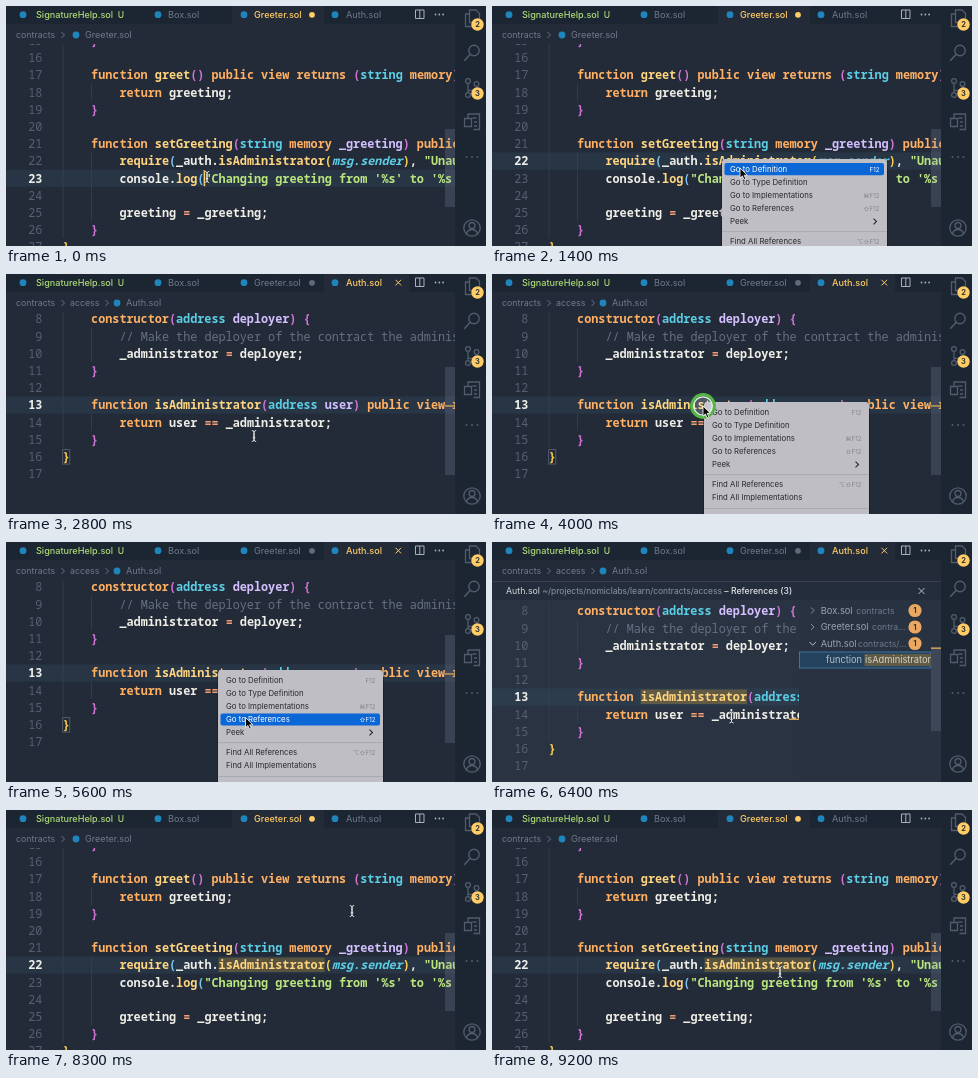
Write an HTML page that moves like this. It is 480 by 240 pixels and loops after 9.3 s.

```html
<!DOCTYPE html>
<html lang="en">
<head>
<meta charset="utf-8">
<title>Code navigation</title>
<style>
  html, body { margin: 0; width: 100%; height: 100%; overflow: hidden; background: #232b39; }
  svg { display: block; width: 480px; height: 240px; }
  text { white-space: pre; font-family: Inter, "Liberation Sans", "DejaVu Sans", sans-serif; }
  .code { font: 700 11.8px "Noto Sans Mono", "DejaVu Sans Mono", monospace; }
  .row rect { fill: none; }
  .row text { fill: #29292d; }
  .row .key { fill: #85848b; }
  .row path { stroke: #29292d; }
  .row.on rect { fill: #0b66d6; }
  .row.on text { fill: #fff; }
  .row.on path { stroke: #fff; }
</style>
</head>
<body>
<svg id="stage" viewBox="0 0 480 240"></svg>
<script>
const NS = 'http://www.w3.org/2000/svg';
const stage = document.getElementById('stage');
const LOOP = 9300, CH = 7.08, LINE = 17.2, LEFT = 56.7;
const BG = '#232b39', BAR = '#1c2532', DIM = '#707a8c', FG = '#eeede6', GOLD = '#ffcc66';
const BRACKETS = ['#ffd24d', '#d474d8', '#7cc4f5'];

function el(parent, tag, attrs = {}, text) {
  const node = document.createElementNS(NS, tag);
  for (const k in attrs) node.setAttribute(k, attrs[k]);
  if (text !== undefined) node.textContent = text;
  return parent.appendChild(node);
}
const group = (parent, attrs) => el(parent, 'g', attrs);
const rect = (parent, x, y, width, height, fill, more) =>
  el(parent, 'rect', { x, y, width, height, fill, ...more });
const line = (parent, d, stroke, width = 1, more) =>
  el(parent, 'path', { d, stroke, fill: 'none', 'stroke-width': width, ...more });
const dot = (parent, cx, cy, r, fill) => el(parent, 'circle', { cx, cy, r, fill });
// y is the middle of the text
const label = (parent, x, y, text, size, fill, more) =>
  el(parent, 'text', { x, y: y + size * 0.36, 'font-size': size, fill, ...more }, text);
const show = (node, on) => { node.style.display = on ? '' : 'none'; };

function clip(id, x, y, width, height) {
  rect(el(stage, 'clipPath', { id }), x, y, width, height);
  return `url(#${id})`;
}

// Syntax colouring
const TOKEN = /\/\/.*|"[^"]*"?|msg\.sender|(?<=(?:memory|address) )\w+|\w+(?=\()|\w+|[(){}]|=+|[^\w(){}="]/g;
const KEYWORDS = /^(function|constructor|public|view|returns|return|memory)$/;
const TYPES = /^(string|address|bool)$/;

function paint(parent, x, y, source, depth) {
  const text = el(parent, 'text', { x, y: y + 4.4, class: 'code', fill: FG });
  for (const m of source.matchAll(TOKEN)) {
    const s = m[0], before = source.slice(0, m.index), after = source[m.index + s.length];
    const attrs = {};
    if (s.startsWith('//')) { attrs.fill = '#657080'; attrs['font-weight'] = 500; }
    else if (s[0] === '"') attrs.fill = '#bae67e';
    else if (s === 'msg.sender') { attrs.fill = '#5ccfe6'; attrs['font-style'] = 'italic'; }
    else if (/[({]/.test(s)) attrs.fill = BRACKETS[depth++ % 3];
    else if (/[)}]/.test(s)) attrs.fill = BRACKETS[--depth % 3];
    else if (KEYWORDS.test(s)) attrs.fill = '#ffb062';
    else if (TYPES.test(s)) attrs.fill = '#5ccfe6';
    else if (/^=/.test(s)) attrs.fill = '#f29e74';
    else if (/\w/.test(s) && after === '(') attrs.fill = '#ffd580';
    else if (/(memory|address) $/.test(before)) attrs.fill = '#d4bfff';
    el(text, 'tspan', attrs, s);
  }
  return depth;
}

const GREETER = {
  first: 15, top: 34.6, depth: 2, guides: [[15, 26, 0], [18, 18, 4], [22, 25, 4]],
  lines: [
    '    }', '',
    '    function greet() public view returns (string memory) {',
    '        return greeting;',
    '    }', '',
    '    function setGreeting(string memory _greeting) public {',
    '        require(_auth.isAdministrator(msg.sender), "Unauthorized");',
    '        console.log("Changing greeting from \'%s\' to \'%s\'", greeting, _greeting);', '',
    '        greeting = _greeting;',
    '    }',
    '}'
  ]
};
const AUTH = {
  first: 8, top: 45, depth: 1, guides: [[8, 15, 0], [9, 10, 4], [14, 14, 4]],
  lines: [
    '    constructor(address deployer) {',
    '        // Make the deployer of the contract the administrator',
    '        _administrator = deployer;',
    '    }', '',
    '    function isAdministrator(address user) public view returns (bool) {',
    '        return user == _administrator;',
    '    }',
    '}', ''
  ]
};

// Draws a file; returns a function that moves the current line
function editor(parent, file, shift = 0) {
  const yOf = n => file.top + shift + (n - file.first) * LINE;
  const band = rect(parent, 0, 0, 449, LINE, '#5a9cb8', { opacity: 0.09 });
  const marks = group(parent);
  for (const [a, b, col] of file.guides)
    rect(parent, LEFT + col * CH, yOf(a) - 8.6, 0.7, (b - a + 1) * LINE, '#3a4252');
  let depth = file.depth;
  const numbers = file.lines.map((source, i) => {
    const n = file.first + i;
    depth = paint(parent, LEFT, yOf(n), source, depth);
    return el(parent, 'text', { x: 36.3, y: yOf(n) + 4.4, class: 'code', 'text-anchor': 'end' }, n);
  });
  const setLine = current => {
    band.setAttribute('y', yOf(current) - 8.6);
    numbers.forEach((node, i) => {
      const on = file.first + i === current;
      node.setAttribute('fill', on ? '#f0f0ea' : '#566070');
      node.style.fontWeight = on ? 700 : 500;
    });
  };
  return { setLine, marks, yOf };
}

const TABS = [
  ['SignatureHelp.sol', 17, 30], ['Box.sol', 152, 162],
  ['Greeter.sol', 238, 248], ['Auth.sol', 329, 340]
];
const chevron = (parent, x, y, color = DIM) =>
  line(parent, `M${x - 1.5} ${y - 3}l3 3l-3 3`, color, 0.9);
const fileIcon = (parent, x, y) => dot(parent, x, y, 3.4, '#1f86bd');

function header(parent, active, crumbs) {
  rect(parent, 0, 0, 449, 38, BG);
  rect(parent, 0, 0, 449, 18, BAR);
  const [x, w] = active === 2 ? [226, 92] : [318, 85];
  rect(parent, x, 0, w, 18, BG);
  TABS.forEach(([name, ix, tx], i) => {
    const on = i === active;
    fileIcon(parent, ix, 8.7);
    label(parent, tx, 8.8, name, 9.1, on ? GOLD : i ? DIM : '#aedb76',
      { 'font-weight': on || !i ? 500 : 400 });
  });
  label(parent, 111.7, 8.8, 'U', 8.6, '#aedb76', { 'font-weight': 500 });
  dot(parent, 306, 8.8, 2.9, active === 2 ? GOLD : '#606a7b');
  if (active === 3) line(parent, 'M389.5 5.8l5.6 5.6m0-5.6l-5.6 5.6', GOLD, 1);
  line(parent, 'M409.5 4h8.5v8.5h-8.5zM413.8 4v8.5', '#a9b0ba', 1);
  for (const cx of [429.5, 433.3, 437.1]) dot(parent, cx, 8.5, 0.9, '#a9b0ba');

  label(parent, 10, 29, 'contracts', 8.8, DIM);
  chevron(parent, 57, 29);
  if (crumbs) {
    label(parent, 64, 29, 'access', 8.8, DIM);
    chevron(parent, 101, 29);
  }
  fileIcon(parent, crumbs ? 111 : 70, 29);
  label(parent, crumbs ? 120 : 79, 29, TABS[active][0], 9.1, DIM);
}

const slider = (parent, y, height) =>
  rect(parent, 439, y, 10, height, '#8794a8', { opacity: 0.22 });

const editorClip = clip('editor', 0, 0, 449, 240);
const previewClip = clip('preview', 0, 58, 307, 182);
const treeClip = clip('tree', 307, 58, 132, 182);

// Greeter.sol
const greeterView = group(stage, { 'clip-path': editorClip });
const greeter = editor(greeterView, GREETER);
const word = rect(greeter.marks, LEFT + 22 * CH, greeter.yOf(22) - 7.5, 15 * CH, 14.5, '#57533f');
const caret = rect(greeterView, 197.6, greeter.yOf(23) - 8, 1.6, 16, GOLD);
slider(greeterView, 123, 78);
header(greeterView, 2, false);

// Auth.sol
const authView = group(stage, { 'clip-path': editorClip });
const auth = editor(authView, AUTH);
auth.setLine(13);
rect(auth.marks, LEFT, auth.yOf(16) - 7, CH, 14.5, 'none', { stroke: '#5b6573', 'stroke-width': 0.8 });
slider(authView, 93, 108);
rect(authView, 439, 131.3, 10, 1.3, '#d8a657');
header(authView, 3, true);

// References panel
const peek = group(stage, { 'clip-path': editorClip });
rect(peek, 0, 39, 449, 201, '#293342');
rect(peek, 0, 39, 449, 19, '#242d3b');
rect(peek, 0, 39, 449, 0.8, '#3b4658');
label(peek, 14, 49, 'Auth.sol', 8.8, '#d5d8dc');
const path = label(peek, 50.5, 49, '~/projects/nomiclabs/learn/contracts/access', 8.45, '#8d96a5');
el(path, 'tspan', { fill: '#e2e4e7', 'font-size': 8.7, 'font-weight': 500 }, ' – References (3)');
line(peek, 'M426.5 46l6 6m0-6l-6 6', '#b8bec8', 1);
const preview = group(peek, { 'clip-path': previewClip });
const previewCode = editor(preview, AUTH, 24);
previewCode.setLine(13);
rect(previewCode.marks, LEFT + 13 * CH, previewCode.yOf(13) - 7.5, 15 * CH, 14.5, '#615b45');
rect(preview, 297, 176.5, 10, 1.5, '#d8a657');
rect(peek, 307, 58, 142, 182, '#283241');
slider(peek, 105, 84);
rect(peek, 439, 105.5, 10, 1.4, '#d8a657');

function tree(rows, selected) {
  const g = group(peek, { 'clip-path': treeClip });
  rows.forEach(([name, rest, restX, open], i) => {
    const y = 68.5 + i * 16.5, on = i === selected;
    if (on) rect(g, 307.5, y - 8, 131, 16, '#23425e', { stroke: '#4480b0', 'stroke-width': 0.8 });
    if (open === undefined) {
      rect(g, restX - 0.5, y - 6, 80, 12, '#615b45');
      label(g, 334, y, name, 9.3, '#b9bec6');
      label(g, restX, y, rest, 9.3, '#d3d3cb');
      return;
    }
    if (open) line(g, `M317.5 ${y - 1.5}l3.2 3.2l3.2-3.2`, '#b8bec8', 1);
    else chevron(g, 320.5, y, '#8d96a5');
    label(g, 328.7, y, name, on ? 8.9 : 9.3, on ? '#fff' : '#9aa2ae', on ? { 'font-weight': 600 } : {});
    label(g, restX, y, rest, 8.6, on ? '#c3cad3' : '#707a8c');
    dot(g, 423, y, 6.6, '#e8a862');
    label(g, 423, y, '1', 8, '#242936', { 'text-anchor': 'middle', 'font-weight': 600 });
  });
  return g;
}
const BOX_ROW = ['Box.sol', 'contracts', 364.3, false];
const AUTH_ROWS = [['Auth.sol', 'contracts/...', 366, true], ['function', 'isAdministrator', 373]];
const treeBefore = tree([BOX_ROW, ['Greeter.sol', 'contra...', 380, false], ...AUTH_ROWS], 3);
const treeAfter = tree([BOX_ROW, ['Greeter.sol', 'contra...', 380, true],
  ['require(_auth.', 'isAdministrator', 396], ...AUTH_ROWS], 1);

// Activity bar
const side = group(stage);
const ICON = '#525c6a';
rect(side, 449, 0, 31, 240, BAR);
function badge(y, n) {
  dot(side, 471.5, y, 6.2, GOLD);
  label(side, 471.5, y, n, 7.6, BAR, { 'text-anchor': 'middle', 'font-weight': 600 });
}
line(side, 'M463.5 4h6.5l3.5 3.5v9h-10zM463.5 8h-4v12.5h10v-4', ICON, 1.3);
badge(18.5, 2);
el(side, 'circle', { cx: 468, cy: 44.5, r: 5.2, fill: 'none', stroke: ICON, 'stroke-width': 1.4 });
line(side, 'M464.3 48.3l-6 6.5', ICON, 1.5);
for (const [cx, cy] of [[462, 75], [462, 89], [470.5, 78]])
  el(side, 'circle', { cx, cy, r: 2.4, fill: 'none', stroke: ICON, 'stroke-width': 1.3 });
line(side, 'M462 77.5v9M470.5 80.5q0 4-8.5 4', ICON, 1.3);
badge(87.5, 3);
line(side, 'M462 112v-4h11.5v15.5h-6M458.5 112.5h7v8h-7zM466.5 112h4M468 116h3M468 120h3', ICON, 1.3);
for (const cx of [460.5, 466, 471.5]) dot(side, cx, 151, 1, ICON);
for (const [cy, r] of [[222, 8.2], [219.5, 3]])
  el(side, 'circle', { cx: 466, cy, r, fill: 'none', stroke: ICON, 'stroke-width': 1.3 });
line(side, 'M460.5 228q1-4.5 5.5-4.5t5.5 4.5', ICON, 1.3);

// Context menu
const menu = group(stage);
rect(menu, -1, 0, 167, 160, '#000', { rx: 4, opacity: 0.25 });
rect(menu, 0, 0, 165, 160, '#bfbec5', { rx: 3.5 });
for (const y of [72.3, 106]) rect(menu, 0, y, 165, 0.8, '#a5a4ab');
const rows = [
  [10, 'Go to Definition', 'F12'], [23, 'Go to Type Definition', ''],
  [36.2, 'Go to Implementations', '⌘F12'], [49.4, 'Go to References', '⇧F12'],
  [62.5, 'Peek', null], [82.5, 'Find All References', '⌥⇧F12'],
  [95.6, 'Find All Implementations', '']
].map(([y, name, key]) => {
  const g = group(menu, { class: 'row' });
  rect(g, 2.5, y - 6, 159.5, 12.2, 'none', { rx: 2 });
  label(g, 8, y, name, 7.8, '#29292d');
  if (key) label(g, 157.5, y + 0.3, key, 6.2, '#85848b', { class: 'key', 'text-anchor': 'end' });
  if (key === null) line(g, `M151.5 ${y - 2.8}l3 2.8l-3 2.8`, '#29292d', 1.1);
  return { y, g };
});

// Pointer and click ring
const ring = group(stage);
el(ring, 'circle', { r: 11.4, fill: 'rgba(255,255,255,.18)', stroke: '#55b544', 'stroke-width': 3 });
el(ring, 'circle', { r: 9.2, fill: 'none', stroke: '#e4f3df', 'stroke-width': 1.2 });
const pointer = group(stage);
const beam = group(pointer);
const BEAM = 'M-2.2 -5.5q2.2 0 2.2 1.8v7.4q0 1.8 -2.2 1.8M2.2 -5.5q-2.2 0 -2.2 1.8v7.4q0 1.8 2.2 1.8M-1.3 1.8h2.6';
line(beam, BEAM, '#1b202c', 2.2, { opacity: 0.7 });
line(beam, BEAM, '#e6e6e6', 1);
const arrow = el(pointer, 'path', {
  d: 'M0 0v10.2l2.4-2.2l1.6 3.7l1.8-.8l-1.6-3.6h3.2z',
  fill: '#0a0a0a', stroke: '#fff', 'stroke-width': 0.8
});
const hand = el(pointer, 'path', {
  d: 'M-1 0q1.2-1 2 0v3.6q1.2-.8 1.9.2q1.2-.6 1.8.3q1.4-.4 1.6.8v2.6q0 1.6-1.2 2.8v1.4h-5.2v-1.2l-3.4-4q-.4-1.4 1-1.2l1.5 1.1z',
  fill: '#fff', stroke: '#1a1a1a', 'stroke-width': 0.8
});

// Pointer stops: time, x, y
const STOPS = [
  [200, 201, 171], [800, 230, 156], [1080, 230, 156], [1350, 248, 162], [3000, 248, 162],
  [3650, 211, 132], [4300, 211, 132], [5300, 239.5, 175.5], [6500, 239.5, 175.5],
  [7250, 334, 93.5], [7750, 334, 93.5], [7950, 346, 101], [8450, 346, 101], [9050, 288, 162]
];
const CLICKS = [900, 1750, 3880, 5750, 7350, 8000];

function place(t) {
  const i = STOPS.findIndex(s => s[0] > t);
  if (i < 1) return STOPS[i ? STOPS.length - 1 : 0].slice(1);
  const [t0, x0, y0] = STOPS[i - 1], [t1, x1, y1] = STOPS[i];
  const k = (t - t0) / (t1 - t0), e = k * k * (3 - 2 * k);
  return [x0 + (x1 - x0) * e, y0 + (y1 - y0) * e];
}

function draw(t) {
  const [x, y] = place(t);
  const inAuth = t >= 2200 && t < 8300;
  const firstMenu = t >= 1000 && t < 1950;
  const secondMenu = t >= 3900 && t < 5950;
  const peeking = t >= 6200 && t < 8300;

  show(greeterView, !inAuth);
  show(authView, inAuth);
  greeter.setLine(t < 900 ? 23 : 22);
  show(caret, t < 500);
  show(word, t >= 8300);
  show(peek, peeking);
  show(treeBefore, t < 7400);
  show(treeAfter, t >= 7400);

  const menuOpen = firstMenu || secondMenu, top = firstMenu ? 153 : 128;
  show(menu, menuOpen);
  menu.setAttribute('transform', `translate(${firstMenu ? 230 : 212} ${top})`);
  for (const r of rows)
    r.g.classList.toggle('on', x > (firstMenu ? 231 : 213) && Math.abs(y - top - r.y) < 6.5);

  const overTree = peeking && x > 307;
  show(arrow, menuOpen);
  show(hand, overTree);
  show(beam, !menuOpen && !overTree);
  pointer.setAttribute('transform', `translate(${x} ${y})`);

  const age = t - CLICKS.findLast(c => c <= t);
  show(ring, age < 300);
  ring.setAttribute('opacity', Math.min(1, (300 - age) / 100) || 0);
  ring.setAttribute('transform', `translate(${x} ${y})`);
}

const start = performance.now();
function tick() {
  draw((performance.now() - start) % LOOP);
  requestAnimationFrame(tick);
}
tick();
</script>
</body>
</html>
```
